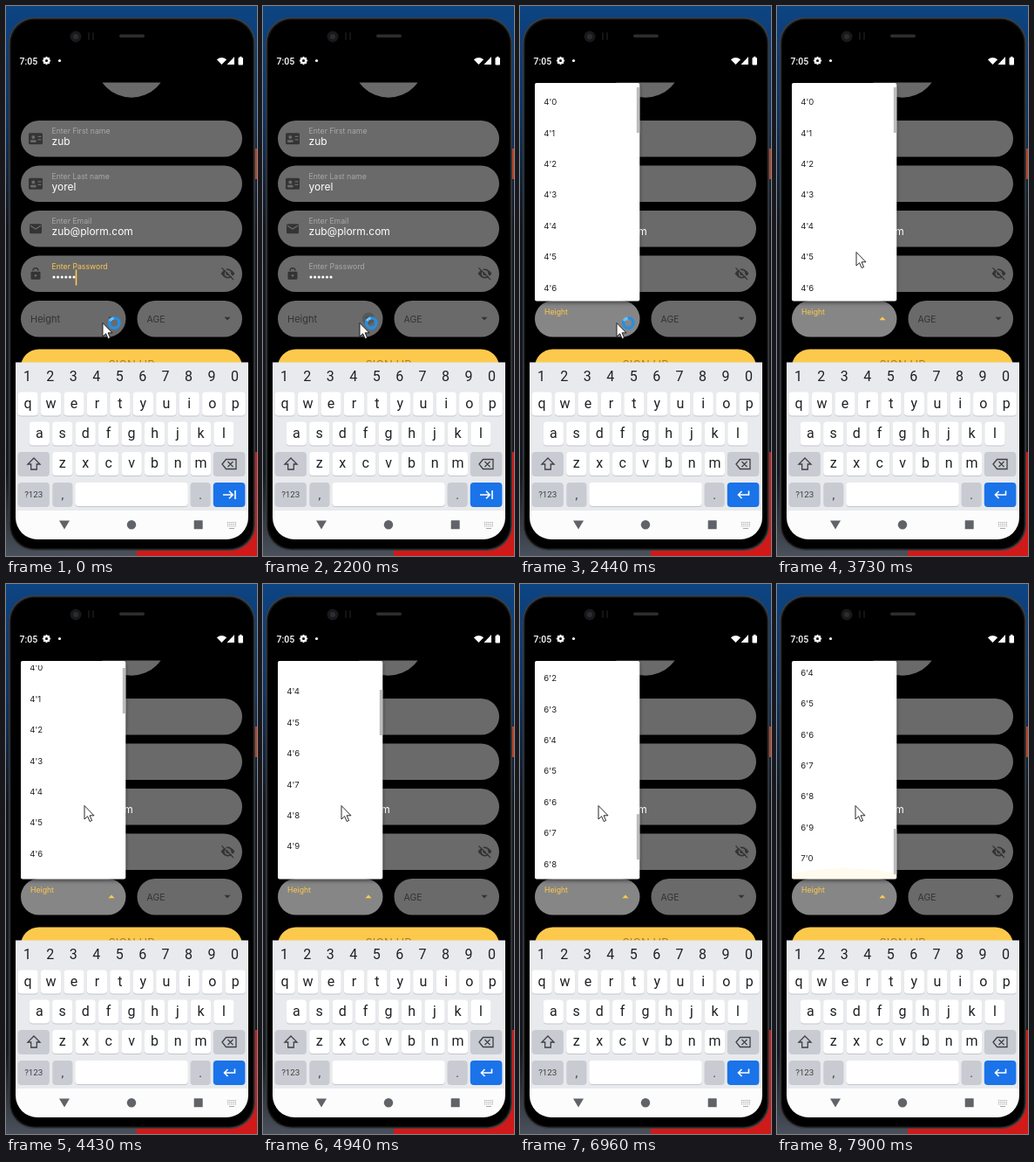
Write an HTML page with a canvas that moves like this. It is 288 px wide and 629 px high and loops after 8 s.

```html
<!DOCTYPE html>
<html lang="en">
<head>
<meta charset="utf-8">
<title>Sign-up form</title>
<style>
html, body { margin: 0; width: 100%; height: 100%; overflow: hidden; background: #000; }
canvas { display: block; width: 288px; height: 629px; }
</style>
</head>
<body>
<canvas id="stage"></canvas>
<script>
const W = 288, H = 629, LOOP = 8000;
const canvas = document.getElementById('stage');
const c = canvas.getContext('2d');
const ratio = window.devicePixelRatio || 1;
canvas.width = W * ratio;
canvas.height = H * ratio;

const UI = 'Inter, "Open Sans", sans-serif';
const KEY = 'Roboto, "Noto Sans", sans-serif';
const GOLD = '#fdc94c', FIELD = '#6a6a6a', ICON = '#343434', INK = '#3c4043';
const PITCH = 35.4;   // height of a menu row
const STEP = 127;     // screen refresh interval, ms
const SHOW = 2320, BOTTOM = 7420;

const clamp = v => Math.max(0, Math.min(1, v));
const smooth = v => v * v * (3 - 2 * v);
const mix = (a, b, v) => a + (b - a) * v;

// Progress of a move that starts at `from` and takes `steps` refreshes.
const stepped = (t, from, steps) => clamp((Math.floor((t - from) / STEP) + 1) / steps);

// One small drag, then two flings down to the end of the list.
function scrollAt(t) {
  return 6 * smooth(stepped(t, 3880, 2))
    + 179 * smooth(stepped(t, 4430, 8))
    + 673 * smooth(stepped(t, 6030, 10.14));
}

function pointerAt(t) {
  if (t < 3070) return [111, 362];
  if (t >= 3880) return [90, 253];
  if (t >= 3730) return [91, 281];
  const v = stepped(t, 3070 + STEP, 3);
  return [mix(96, 92, v), mix(328, 288, v)];
}

const openAt = t => t < SHOW ? 0 : .6 + .4 * stepped(t, SHOW + 120, 1);
const glowAt = t => t < BOTTOM ? 0 : .25 * Math.exp((BOTTOM - t) / 520);
const caretAt = t => t < 2080 && Math.floor(t / 515) % 2 === 0;
const rippleAt = t => t >= 2080 && t < SHOW ? 14 * stepped(t, 2080, 2) : 0;

function box(x, y, w, h, r, fill) {
  c.beginPath();
  c.roundRect(x, y, w, h, r);
  c.fillStyle = fill;
  c.fill();
}

function disc(x, y, r, fill) {
  c.beginPath();
  c.arc(x, y, r, 0, 7);
  c.fillStyle = fill;
  c.fill();
}

function arc(x, y, r, from, to, color, width) {
  c.beginPath();
  c.arc(x, y, r, from, to);
  c.strokeStyle = color;
  c.lineWidth = width;
  c.stroke();
}

// Paths are written as SVG path strings.
function fill(d, color) {
  c.fillStyle = color;
  c.fill(new Path2D(d));
}

function line(d, color, width = 1) {
  c.strokeStyle = color;
  c.lineWidth = width;
  c.stroke(new Path2D(d));
}

function text(s, x, y, size, color, align = 'left', font = UI, weight = 400) {
  c.font = `${weight} ${size}px ${font}`;
  c.textAlign = align;
  c.fillStyle = color;
  c.fillText(s, x, y);
}

function at(x, y, draw) {
  c.save();
  c.translate(x, y);
  draw();
  c.restore();
}

function clipped(x, y, w, h, r, draw) {
  c.save();
  c.beginPath();
  c.roundRect(x, y, w, h, r);
  c.clip();
  draw();
  c.restore();
}

function backdrop() {
  const g = c.createLinearGradient(0, 0, 0, H);
  g.addColorStop(0, '#0d4482');
  g.addColorStop(.2, '#0b3568');
  g.addColorStop(.4, '#10161f');
  g.addColorStop(.85, '#14181f');
  g.addColorStop(1, '#4a515c');
  c.fillStyle = g;
  c.fillRect(0, 0, W, H);
  box(284, 163, 4, 35, 0, '#b8452a');
  fill('M150 629V600H270L280 510H288V629Z', '#d01a1a');
}

function phone() {
  box(3, 13, 283, 610, 29, '#3c3e41');
  box(4.5, 14.5, 280, 607, 28, '#101112');
  box(6, 16, 277, 604, 27, '#000');
  disc(80, 35, 6.5, '#17191b');
  disc(80, 35, 3, '#2b2d30');
  box(94, 30, 2, 9, 1, '#141414');
  box(99, 30, 2, 9, 1, '#141414');
  box(130, 32.5, 29, 3.5, 1.7, '#2c2e30');
}

function statusBar() {
  text('7:05', 15.5, 66.5, 10.5, '#fff', 'left', KEY, 500);
  at(46.5, 62.5, () => {
    for (let i = 0; i < 4; i++) {
      line('M-4.6 0H4.6', '#fff', 2);
      c.rotate(Math.PI / 4);
    }
    disc(0, 0, 3.6, '#fff');
    disc(0, 0, 1.5, '#000');
  });
  disc(61.5, 62.5, 1.6, '#fff');
  fill('M247.5 67L241.9 61.3Q247.5 56.7 253.1 61.3Z', '#fff');
  fill('M253.5 67H262V58Z', '#fff');
  box(266.5, 59, 5.5, 8.5, 1, '#fff');
  box(268, 57.8, 2.5, 2, 0, '#fff');
}

function contactIcon() {
  box(-8, -6.5, 16, 13, 1.5, ICON);
  disc(-2.7, -1.6, 2, FIELD);
  box(-6.2, 1.6, 7, 2.6, 1.3, FIELD);
  line('M2.5 -2.4H6.5M2.5 1.1H6.5', FIELD, 1.3);
}

function mailIcon() {
  box(-7, -5.5, 14, 11, 1.5, ICON);
  line('M-6 -3.5L0 .3L6 -3.5', FIELD, 1.3);
}

function lockIcon() {
  box(-5.5, -2.5, 11, 9, 1.2, ICON);
  arc(0, -3.5, 3, Math.PI, 0, ICON, 1.4);
  disc(0, 2, 1.3, FIELD);
}

function eyeIcon() {
  fill('M-8 0Q0 -11 8 0Q0 11 -8 0', ICON);
  disc(0, 0, 3.7, FIELD);
  disc(0, 0, 2.3, ICON);
  line('M-6 -7.5L8 6', FIELD, 1.6);
  line('M-7 -6.5L6.5 7', ICON, 1.3);
}

function arrow(x, dir, color) {
  at(x, 357.5, () => {
    c.scale(1, dir);
    fill('M-3.6 -1.8H3.6L0 1.9Z', color);
  });
}

function field(row, label, value, icon, color = '#a9a9a9') {
  at(17, 131 + 51.5 * row, () => {
    box(0, 0, 254, 41.5, 20.7, FIELD);
    at(17, 20.7, icon);
    text(label, 35.5, 15.4, 8.7, color);
    text(value, 35.5, 28.2, 12, '#fff');
  });
}

function form(t, open) {
  clipped(11, 87.5, 267, 322, 0, () => {
    disc(144, 63.5, 41.2, FIELD);
    field(0, 'Enter First name', 'zub', contactIcon);
    field(1, 'Enter Last name', 'yorel', contactIcon);
    field(2, 'Enter Email', 'zub@plorm.com', mailIcon);
    field(3, 'Enter Password', '', lockIcon, t < 2080 ? GOLD : undefined);
    for (let i = 0; i < 6; i++) disc(55 + 4.6 * i, 310, 1.55, '#fff');
    if (caretAt(t)) box(79.7, 301.5, 1.6, 18, 0, GOLD);
    at(254.5, 306, eyeIcon);

    box(17, 337, 120.5, 41.5, 20.7, open ? '#868686' : FIELD);
    box(150.5, 337, 120.5, 41.5, 20.7, FIELD);
    disc(121, 357.5, rippleAt(t), '#585858');
    if (open) text('Height', 28, 352.5, 8.7, GOLD);
    else text('Height', 28, 361.5, 11, '#333');
    arrow(121, open ? -1 : 1, open ? GOLD : ICON);
    text('AGE', 161.5, 361.5, 10.5, '#333');
    arrow(254, 1, ICON);

    box(17, 392.5, 254, 41.5, 20.7, GOLD);
    text('SIGN UP', 144, 414.6, 13, '#a5812c', 'center');
  });
}

function menu(t, open) {
  if (!open) return;
  const h = 249.5 * open, offset = scrollAt(t);
  c.save();
  c.shadowColor = 'rgba(0,0,0,.5)';
  c.shadowBlur = 4;
  c.shadowOffsetY = 2;
  box(17, 88, 120.3, h, 2, '#fff');
  c.restore();
  clipped(17, 93, 120, h - 10.5, 0, () => {
    for (let i = 0; i <= 30; i++) {
      c.globalAlpha = open < 1 ? clamp(.8 - i * .25) : 1;
      text(`${4 + Math.floor(i / 10)}'${i % 10}`, 27.3, 113.1 + PITCH * i - offset, 9.6, '#222');
    }
  });
  if (open === 1) box(133.8, 93 + offset * .218, 3.5, 52, 0, '#bcbcbc');
  clipped(17, 300, 120, 37.5, 0, () => {
    c.globalAlpha = glowAt(t);
    c.beginPath();
    c.ellipse(77, 352, 92, 27, 0, 0, 7);
    c.fillStyle = GOLD;
    c.fill();
  });
}

function key(x, y, w, color) {
  if (!color) box(x, y + 1, w, 27, 4, '#c3c6cb');
  box(x, y, w, color ? 28 : 27, 4, color || '#fff');
}

function keyRow(letters, first, y, caps = true) {
  [...letters].forEach((s, i) => {
    const x = first + 26.45 * i;
    if (caps) key(x - 11.6, y, 23.2);
    text(s, x, y + 18.2, 16, '#202124', 'center', KEY);
  });
}

function keyboard(t) {
  const grey = '#c8ccd2', nav = '#606367';
  clipped(11, 407.5, 267, 202.5, [0, 0, 25, 25], () => {
    box(11, 407, 267, 170, 0, '#e8eaed');
    box(11, 577, 267, 33, 0, '#fcfcfd');

    keyRow('1234567890', 24.4, 410.4, false);
    keyRow('qwertyuiop', 25.1, 441.5);
    keyRow('asdfghjkl', 38.3, 475.5);
    keyRow('zxcvbnm', 64.8, 510);

    for (const y of [510, 545]) key(13.6, y, 36.3, grey);
    key(237.8, 510, 36.6, grey);
    key(237.8, 545, 36.6, '#1a73e8');
    key(53.3, 545, 23.2, grey);
    key(79.3, 545, 129.5);
    key(211.5, 545, 23.2, grey);

    line('M32 517l7 7h-3.7v6h-6.6v-6h-3.7Z', INK, 1.3);
    line('M248 524l4.5-5.5H264v11H252.5ZM254.5 521l6 6m0-6l-6 6', INK, 1.3);
    text('?123', 31.8, 562.3, 9.8, INK, 'center', KEY);
    text(',', 65, 564, 14, INK, 'center', KEY);
    text('.', 223.2, 564, 14, INK, 'center', KEY);
    line(t < SHOW
      ? 'M249 559h11m-4-4.3l4.3 4.3l-4.3 4.3M263 554v10'
      : 'M262.5 554.5v4.5h-12m4-4l-4 4l4 4', '#fff', 1.6);

    fill('M61 588.5h12l-6 10Z', nav);
    disc(144, 593.3, 5.2, nav);
    box(215.7, 588.3, 10, 10, .5, nav);
    for (let i = 0; i < 15; i++)
      box(254 + (i % 5) * 2.2, 590 + Math.floor(i / 5) * 2.2, 1.2, 1.2, 0, '#a5a8ac');
    box(256, 597, 6, 1, 0, '#a5a8ac');
  });
}

function pointer(t) {
  if (t < 2810) {
    arc(124.3, 362.6, 5.7, 0, 7, '#2390e4', 3.4);
    arc(124.3, 362.6, 5.7, 3.6, 4.6, '#6cc0f8', 3);
  }
  const [x, y] = pointerAt(t);
  at(x, y + .5, () => {
    const shape = 'M0 0V15.5L3.6 12.2L6.2 18L8.6 17L6.1 11.3H11Z';
    fill(shape, '#fff');
    line(shape, '#111', .9);
  });
}

function draw(t) {
  const open = openAt(t);
  c.setTransform(ratio, 0, 0, ratio, 0, 0);
  backdrop();
  phone();
  statusBar();
  form(t, open);
  menu(t, open);
  keyboard(t);
  pointer(t);
}

const start = performance.now();
function tick() {
  draw((performance.now() - start) % LOOP);
  requestAnimationFrame(tick);
}
tick();
</script>
</body>
</html>
```
